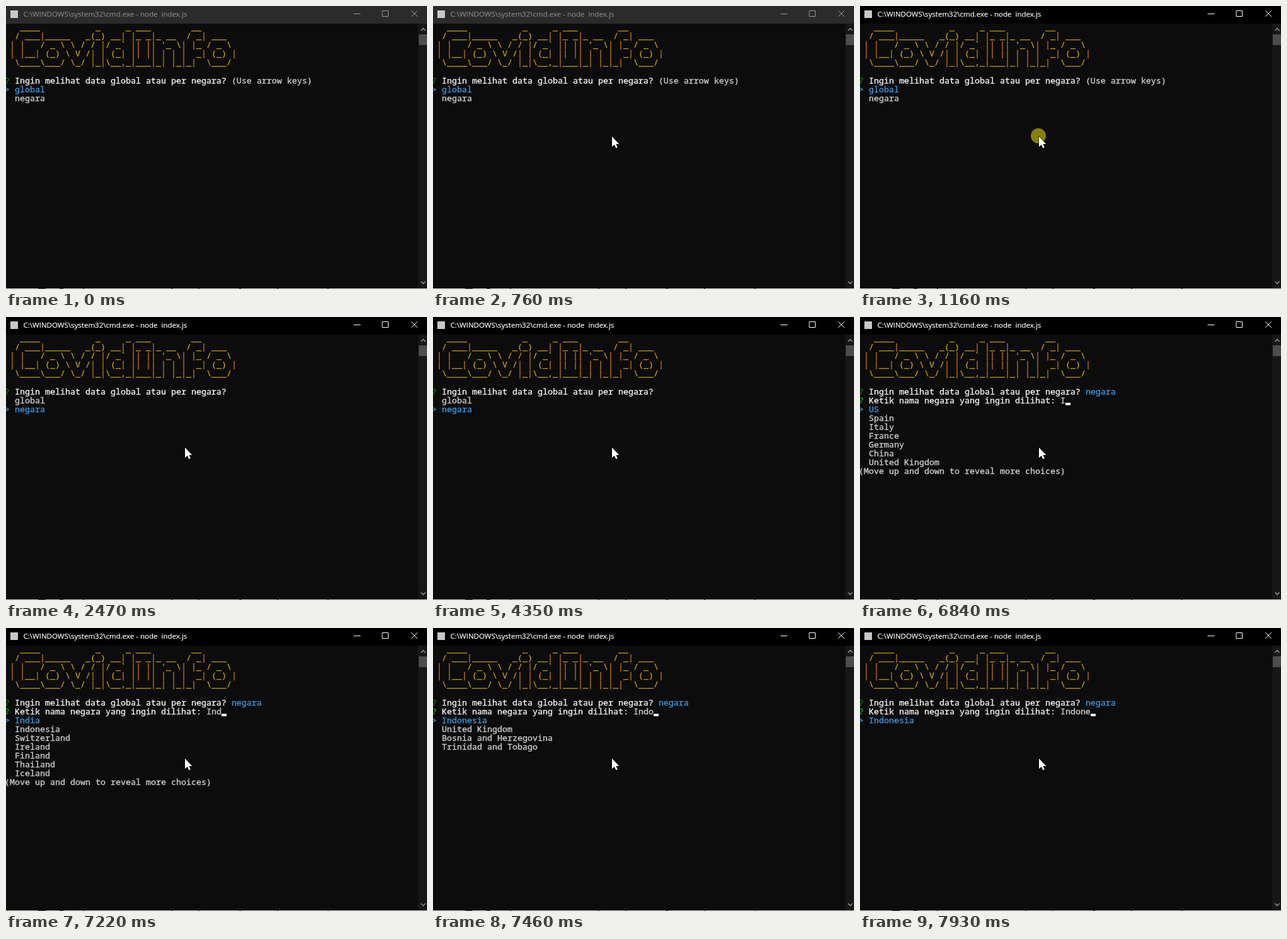
Write an HTML page that moves like this. It is 668 px wide and 449 px high and loops after 8 s.

```html
<!DOCTYPE html>
<html lang="id">
<head>
<meta charset="utf-8">
<title>Terminal</title>
<style>
html, body { margin: 0; width: 100%; height: 100%; overflow: hidden; background: #0c0c0c; }
svg { display: block; }
text { white-space: pre; font: 13.3333px "Noto Sans Mono", "DejaVu Sans Mono", monospace; font-variant-ligatures: none; }
text, tspan { fill: currentColor; stroke: currentColor; stroke-width: .35px; }
#title { font: 11.53px "Open Sans", "Noto Sans", sans-serif; stroke-width: .2px; }
.y { color: #c19c00; } .o { color: #c1760a; }
.w { color: #f2f2f2; } .n { color: #ccc; } .b { color: #3a96dd; }
.g { color: #13a10e; } .d { color: #126a10; }
</style>
</head>
<body>
<svg width="668" height="449" viewBox="0 0 668 449">
  <rect width="668" height="449" fill="#0c0c0c"/>
  <rect id="bar" width="668" height="28"/>
  <rect x="7" y="7" width="12" height="12" fill="#c8c8c8"/>
  <text id="title" x="27.5" y="17">C:\WINDOWS\system32\cmd.exe - node  index.js</text>
  <path id="buttons" fill="none" d="M552 12.5h10M597.5 7.5h9v9h-9zM643.5 7.5l9 9M652.5 7.5l-9 9" stroke-linecap="square"/>
  <g id="art" transform="translate(0 -1)"></g>
  <g id="screen"></g>
  <rect id="caret" y="136" width="8" height="4" fill="#f2f2f2"/>
  <rect x="654" y="28" width="14" height="420" fill="#171717"/>
  <rect x="655" y="45" width="13" height="17" fill="#4d4d4d"/>
  <path d="M658.5 39l3.5-3.5 3.5 3.5M658.5 437l3.5 3.5 3.5-3.5" fill="none" stroke="#9a9a9a" stroke-width="1.3"/>
  <rect y="448" width="668" height="1" fill="#c8c8c8"/>
  <path d="M51 448.5h12M85 448.5h6M122 448.5h2M262 448.5h2M305 448.5h2M370 448.5h3M430 448.5h2M510 448.5h2" stroke="#444"/>
  <circle id="click" cx="283" cy="206" r="12" fill="#84800a"/>
  <path id="mouse" d="M0 0V16.5L3.8 13 6.3 18.6 8.8 17.5 6.4 12H11.3Z" fill="#fff" stroke="#000" stroke-width="1.2" paint-order="stroke"/>
</svg>
<script>
const LOOP = 8000;
const $ = id => document.getElementById(id);
const span = (cls, s) => `<tspan class="${cls}">${s}</tspan>`;
const row = (i, s) => `<text x="-2" y="${39 + 14 * i}">${s}</text>`;

const art = [
  "  ____           _     _ ___        __",
  " / ___|_____   _(_) __| |_ _|_ __  / _| ___",
  "| |   / _ \\ \\ / / |/ _` || || '_ \\| |_ / _ \\",
  "| |__| (_) \\ V /| | (_| || || | | |  _| (_) |",
  " \\____\\___/ \\_/ |_|\\__,_|___|_| |_|_|  \\___/"
];
$("art").innerHTML = art.map((s, i) =>
  row(i, span("y", " " + s.replace(/\|+/g, m => span("o", m))))).join("");

const scopes = ["global", "negara"];
const lists = {
  all: ["US", "Spain", "Italy", "France", "Germany", "China", "United Kingdom"],
  i: ["Spain", "Italy", "China", "United Kingdom", "Iran", "Belgium", "Brazil"],
  in: ["Spain", "China", "India", "Indonesia", "Ukraine", "Dominican Republic", "Singapore"],
  ind: ["India", "Indonesia", "Switzerland", "Ireland", "Finland", "Thailand", "Iceland"],
  indo: ["Indonesia", "United Kingdom", "Bosnia and Herzegovina", "Trinidad and Tobago"],
  indon: ["Indonesia", "Bosnia and Herzegovina"],
  indone: ["Indonesia"]
};

const menu = (items, picked, top) => items.map((s, i) =>
  row(top + i, i === picked ? span("b", "&gt; " + s) : span("n", "  " + s))).join("");
const ask = (i, mark, q, tail) => row(i, span(mark, "?") + span("w", " " + q + " ") + tail);
const first = tail => ask(6, "d", "Ingin melihat data global atau per negara?", tail);

function scope(picked, hint) {
  return first(hint ? span("n", "(Use arrow keys)") : "") + menu(scopes, picked, 7);
}

function search(typed, key) {
  const items = lists[key];
  const tail = span("n", typed || "(Use arrow keys or type to search)");
  return first(span("b", "negara"))
    + ask(7, "g", "Ketik nama negara yang ingin dilihat:", tail)
    + menu(items, 0, 8)
    + (items.length === 7 ? row(15, span("n", "(Move up and down to reveal more choices)")) : "");
}

// [start, markup, caret x]
const screens = [
  [0, scope(0, true)],
  [2470, scope(1)],
  [2790, scope(0)],
  [4350, scope(1)],
  [5280, search("", "all"), 590],
  [5360, search("", "all")],
  [5910, search("", "all"), 590],
  [6440, search("", "all")],
  [6840, search("I", "all"), 326],
  [6920, search("I", "i"), 326],
  [7070, search("In", "in"), 334],
  [7220, search("Ind", "ind"), 342],
  [7390, search("Indo", "ind"), 350],
  [7460, search("Indo", "indo"), 350],
  [7860, search("Indon", "indon"), 358],
  [7930, search("Indone", "indone"), 366]
];
const moves = [[0, -50, -50], [610, 434, 306], [680, 326, 240], [760, 284, 207]];

const at = (steps, t) => steps.findLast(s => s[0] <= t);
const show = (id, on) => $(id).setAttribute("visibility", on ? "visible" : "hidden");
let shown;

function draw() {
  const t = performance.now() % LOOP;
  const now = at(screens, t);
  if (now !== shown) {
    shown = now;
    $("screen").innerHTML = now[1];
    show("caret", now[2]);
    $("caret").setAttribute("x", now[2] || 0);
  }
  const active = t >= 1160;
  $("bar").setAttribute("fill", active ? "#000" : "#2b2b2b");
  $("title").setAttribute("color", active ? "#fff" : "#858585");
  $("buttons").setAttribute("stroke", active ? "#fff" : "#999");
  show("click", active && t < 1310);
  const [, x, y] = at(moves, t);
  $("mouse").setAttribute("transform", `translate(${x} ${y})`);
  requestAnimationFrame(draw);
}
draw();
</script>
</body>
</html>
```
